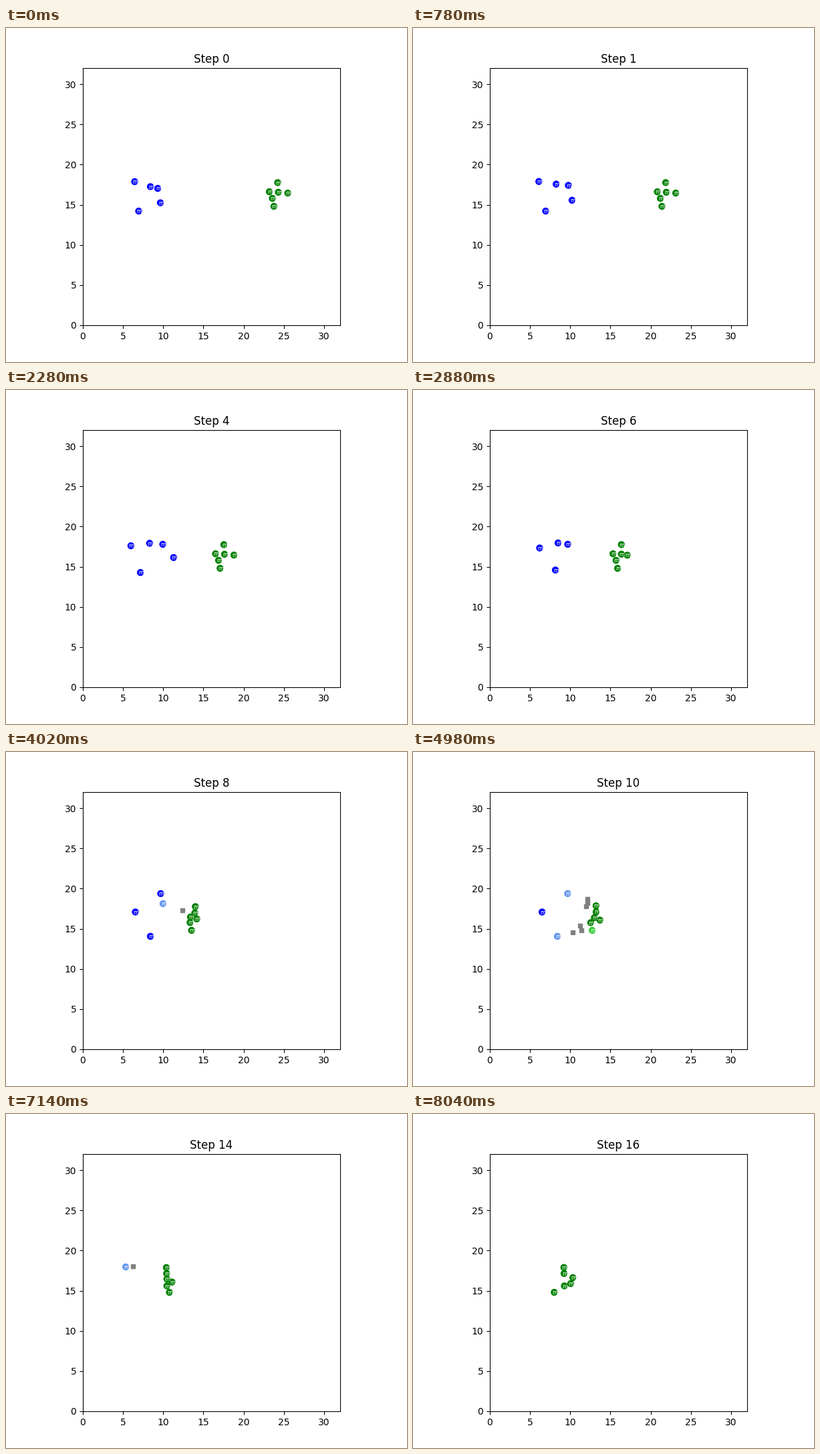
A matplotlib script that plays this animation: 600 px wide and 500 px high, repeating every 8.1 s.

```python
import numpy as np
import matplotlib.pyplot as plt
from matplotlib.animation import FuncAnimation
from matplotlib.patches import Circle, Rectangle

ROUNDS, TICKS = 15, 8        # decision rounds, world ticks per round
FRAMES, INTERVAL = ROUNDS * (TICKS + 1), 60
MAP = 32
SPEED = 3.15 / 16            # map units per tick
RADIUS = 0.375
INSET = RADIUS * np.sqrt(2) / 2

# scouts wander between a few (tick, x, y) points
SCOUTS = {
    "a": [(0, 6.44, 17.87), (24, 5.74, 17.91), (43, 6.19, 17.33),
          (60, 6.53, 17.08), (88, 6.46, 17.08), (96, 5.33, 17.96)],
    "b": [(0, 8.40, 17.25), (24, 8.10, 17.87), (48, 8.58, 17.98), (56, 9.97, 18.12)],
    "c": [(0, 9.31, 17.03), (24, 10.22, 17.79), (48, 9.54, 17.79), (56, 9.68, 19.37)],
    "d": [(0, 6.94, 14.21), (32, 6.94, 14.21), (43, 8.15, 14.59), (48, 8.40, 14.05)],
    "e": [(0, 9.64, 15.24), (40, 11.58, 16.30)],
}
FALLS = {"e": 46, "b": 82, "c": 90, "d": 103, "a": 127}

# the squad marches left from here
SQUAD = {"g0": (23.19, 16.61), "g1": (24.23, 17.75), "g2": (24.31, 16.55),
         "g3": (23.57, 15.79), "g4": (25.48, 16.45), "g5": (23.76, 14.80)}

# round -> target -> shooters; a shooter stands still, even if its target has fallen
ORDERS = {
    5: {"e": "g0 g1 g2 g3 g5"},
    7: {"b": "g0"},
    8: {"b": "g0 g1 g2 g4", "d": "g3 g5"},
    9: {"b": "g4", "c": "g0 g1 g2", "d": "g3 g5", "g5": "d"},
    10: {"d": "g3 g5", "g5": "d"},
    11: {"c": "g0 g1 g2 g4", "d": "g3 g5"},
    13: {"a": "g0"},
    14: {"a": "g0 g1 g2 g3 g4"},
}
REGROUP = 10                 # round marched at about half pace


def push_apart(pos):
    """Move every overlapping pair apart by half its overlap each."""
    delta = pos[:, None] - pos[None]
    dist = np.linalg.norm(delta, axis=2) + np.eye(len(pos))
    overlap = np.maximum(2 * RADIUS / dist - 1, 0)
    return pos + (delta * overlap[..., None]).sum(axis=1) / 2


def march():
    """Squad positions for every tick."""
    pos = np.array(list(SQUAD.values()))
    track = [pos]
    for rnd in range(ROUNDS):
        busy = " ".join(ORDERS.get(rnd, {}).values()).split()
        pace = SPEED * (0.54 if rnd == REGROUP else 1)
        step = np.array([(0 if name in busy else -pace, 0) for name in SQUAD])
        for _ in range(TICKS):
            pos = push_apart(pos + step)
            track.append(pos)
    return np.array(track)


def wander(points):
    t, x, y = np.array(points).T
    ticks = np.arange(ROUNDS * TICKS + 1)
    return np.column_stack([np.interp(ticks, t, x), np.interp(ticks, t, y)])


paths = {name: wander(points) for name, points in SCOUTS.items()}
paths.update(zip(SQUAD, march().swapaxes(0, 1)))

fig = plt.figure(figsize=(6, 5), dpi=100)
ax = fig.add_subplot()
ax.set(xlim=(0, MAP), ylim=(0, MAP), aspect="equal")
title = ax.set_title("Step 0")

dots = {name: ax.add_patch(Circle((0, 0), RADIUS)) for name in paths}
labels = {name: ax.text(0, 0, "m", fontsize="xx-small", color="white") for name in paths}
bullets = [ax.add_patch(Rectangle((0, 0), 0.5, 0.5, color="gray")) for _ in SQUAD]


def color(name, hit):
    if name in SCOUTS:
        return "cornflowerblue" if hit else "blue"
    return "limegreen" if hit else "green"


def draw(frame):
    # every round shows both its first and its last state
    rnd, sub = divmod(frame, TICKS + 1)
    step, phase = divmod(frame, TICKS)
    title.set_text(f"Step {step}")

    pos = {name: path[rnd * TICKS + sub] for name, path in paths.items()}
    alive = {name for name in paths if frame < FALLS.get(name, FRAMES)}
    shots = [(pos[shooter], pos[target], target)
             for target, group in ORDERS.get(rnd, {}).items()
             for shooter in group.split() if {shooter, target} <= alive]
    hit = {target for _, _, target in shots}

    for name, dot in dots.items():
        dot.set_center(pos[name])
        dot.set_color(color(name, name in hit))
        dot.set_visible(name in alive)
        labels[name].set_position(pos[name] - INSET)
        labels[name].set_visible(name in alive)

    for k, bullet in enumerate(bullets):
        bullet.set_visible(k < len(shots))
        if k < len(shots):
            start, goal, _ = shots[k]
            bullet.set_xy(start + (goal - start) * phase / TICKS)
    return []


anim = FuncAnimation(fig, draw, frames=FRAMES, interval=INTERVAL,
                     repeat=True, repeat_delay=0, blit=False)
plt.show()
```
